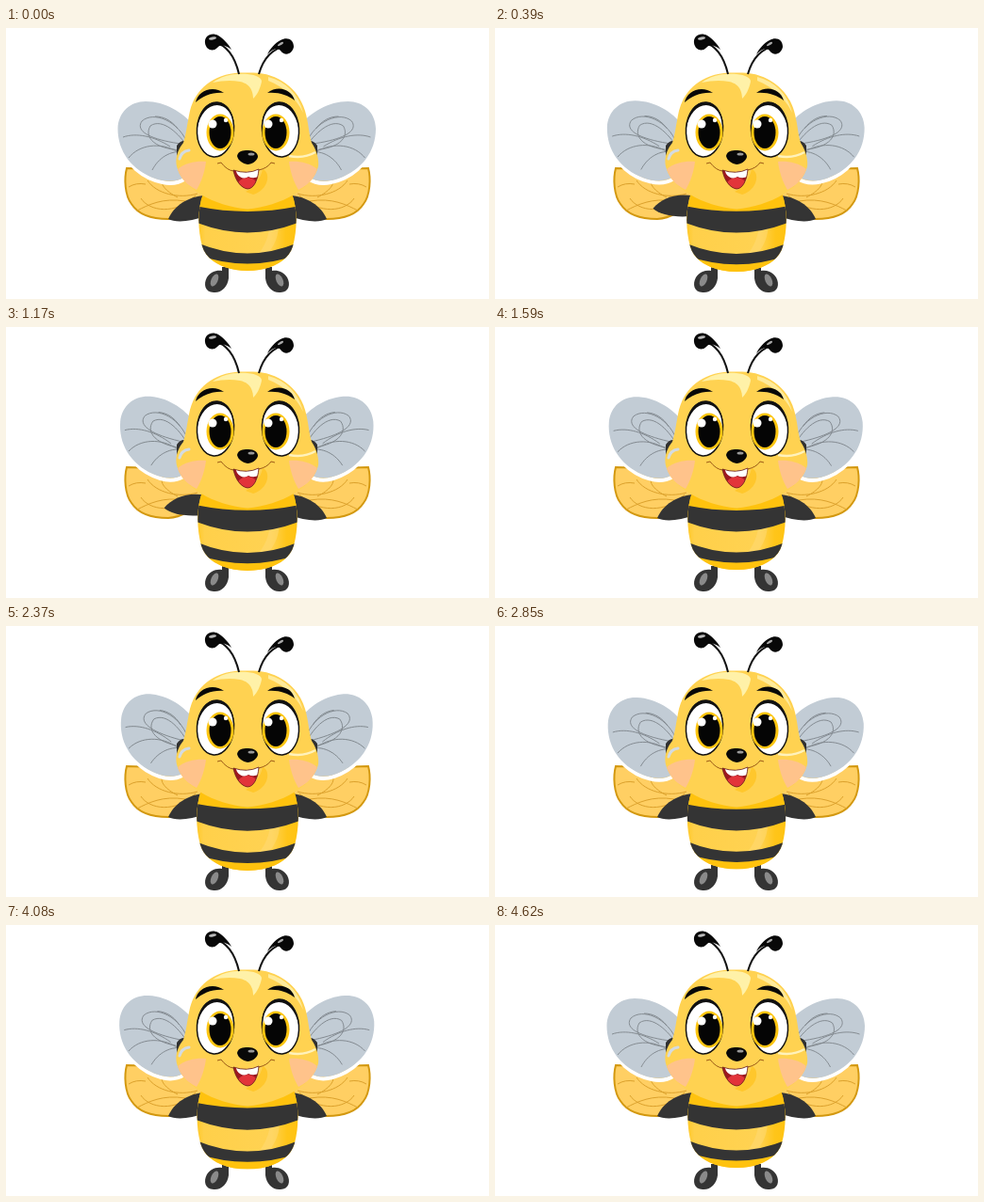
These frames come from a looping animation (512 by 288 pixels, 4.65 s). An HTML page:

```html
<!DOCTYPE html>
<html lang="en">
<head>
<meta charset="utf-8">
<title>Bee</title>
<style>
html, body { margin: 0; width: 100%; height: 100%; overflow: hidden; background: #fff; }
svg { display: block; width: 100vw; height: 100vh; }
</style>
</head>
<body>
<svg viewBox="0 0 512 288">
  <defs>
    <linearGradient id="belly" x1="0" x2="1" y1="0" y2="0">
      <stop offset="0" stop-color="#ffc414"/><stop offset=".1" stop-color="#ffd04a"/><stop offset=".72" stop-color="#ffd252"/><stop offset=".86" stop-color="#ffc51a"/><stop offset="1" stop-color="#ffc20e"/>
    </linearGradient>
    <clipPath id="bodyClip"><path d="M209 176C203 192 203 214 208 232C213 249 234 258 256 258C278 258 299 249 304 232C309 214 309 192 303 176Z"/></clipPath>
    <clipPath id="headClip"><path id="headShape" d="M248 47.500C219 49 201 65 195 88C192 102 191 113 188 122C182 129 179 139 181 147C186 170 220 189 256 192.500C292 189 326 170 331 147C332 139 329 129 324 122C321 113 321 102 317 88C310 64 288 48 262 47.500Z"/></clipPath>
    <clipPath id="mouthClip"><path id="mouth" d="M241 151Q256 156 268 150C267 163 262 171 256 171C249 170 243 162 241 151Z"/></clipPath>

    <g id="lowWing">
      <path d="M128 149C125 160 126 178 133 187C140 198 155 203 172 203C187 202 200 193 210 181L206 160L160 150Z" fill="#ffcf63" stroke="#d3980f" stroke-width="2"/>
      <path d="M203 176C183 182 159 176 150 162M201 178C180 199 152 195 143 181M190 184C166 180 151 188 139 194M182 180C170 174 161 165 167 158M130 169Q138 164 148 166" fill="none" stroke="#dba12c" stroke-width="1"/>
    </g>
    <g id="topWing">
      <path d="M119 120C127 146 146 160 166 164Q180 167 190 160" fill="none" stroke="#fff" stroke-width="4"/>
      <path d="M198 103C188 90 169 78 148 78C132 78 119 89 118.500 107C118.500 131 133 151 158 160C169 164 181 164 190 158L204 135Z" fill="#c2ccd5"/>
      <path d="M193 124C183 98 156 88 144 99C136 111 157 120 193 124M193 127C184 113 166 95 153 104C146 116 157 130 192 130M190 132C174 129 161 139 155 151M181 131C163 121 141 124 130 138M174 126C157 115 138 111 124 116M182 107C175 98 167 94 158 94" fill="none" stroke="#7e858b" stroke-width=".9"/>
    </g>
    <g id="foot">
      <path d="M229 254H236V266C235 275 228 282 220 281C211 281 209 272 213 265C217 259 223 257 229 258Z" fill="#343434"/>
      <ellipse cx="221" cy="268" rx="3.500" ry="7" transform="rotate(24 221 268)" fill="#8a8a8a"/>
    </g>
    <path id="armShape" d="M211 178C193 179 178 189 172 203C179 207 196 206 211 200Z" fill="#343434"/>
    <path id="cheek" d="M182 150C190 143 203 141 212 142C211 152 207 164 202 172C192 167 184 160 182 150Z" fill="#ffc38b"/>
    <g id="eye">
      <ellipse cx="222" cy="108" rx="19.500" ry="29" fill="#fff" stroke="#111" stroke-width="1.500"/>
      <path d="M202.500 108C203 90 210 79 222 79C232 79 239 87 241 99C237 88 231 82 222 82C212 83 205 92 202.500 108Z" fill="#111"/>
    </g>
    <g id="pupil">
      <ellipse rx="14.500" ry="19.500" fill="#fdc510"/>
      <ellipse rx="11.500" ry="17" fill="#050505"/>
      <g fill="#fff"><circle cx="-8" cy="-9" r="4.500"/><circle cx="6" cy="-13" r="2.200"/></g>
    </g>
  </defs>

  <rect width="512" height="288" fill="#fff"/>
  <use href="#lowWing"/>
  <use href="#lowWing" transform="matrix(-1 0 0 1 512 0)"/>
  <g id="wingL"><use href="#topWing"/></g>
  <g transform="matrix(-1 0 0 1 510.500 0)"><g id="wingR"><use href="#topWing"/></g></g>
  <use id="arm" href="#armShape"/>
  <use href="#armShape" transform="matrix(-1 0 0 1 512 0)"/>
  <use href="#foot"/>
  <use href="#foot" transform="matrix(-1 0 0 1 511 0)"/>

  <g id="body">
    <g clip-path="url(#bodyClip)">
      <rect x="200" y="170" width="112" height="92" fill="url(#belly)"/>
      <path d="M200 170H312V205H200ZM200 236Q256 258 312 236V262H200Z" fill="#ffc20e"/>
      <path d="M279 214C277 226 272 236 264 244L274 243C283 234 288 225 289 211Z" fill="#ffdc78" opacity=".5"/>
      <path d="M200 189Q256 201 312 189V206Q256 229 200 206Z" fill="#343434"/>
      <path d="M200 227Q256 252 312 227V240Q256 261 200 240Z" fill="#343434"/>
    </g>
  </g>

  <path d="M181 125Q187 117 193 122L190 137L181 136Z" fill="#303030"/>
  <path d="M330 125Q324 117 318 122L321 137L330 136Z" fill="#303030"/>
  <use href="#headShape" fill="#ffd251"/>
  <g clip-path="url(#headClip)">
    <path d="M219 58C229 51 240 48 256 49C266 50 271 53 271 57C269 66 266 71 262 75C262 66 258 59 248 57C238 55 229 56 219 58Z" fill="#fff1a8"/>
    <path d="M278 52C297 57 310 70 315 90C307 74 295 63 278 56Z" fill="#ffeb9b"/>
    <use href="#cheek"/>
    <use href="#cheek" transform="matrix(-1 0 0 1 512 0)"/>
    <path d="M254 174C263 170 270 160 272 150C281 153 279 172 262 177Z" fill="#ffc72c"/>
  </g>
  <path d="M184 139Q186 131 194 130" fill="none" stroke="#d4dbe0" stroke-width="3" stroke-linecap="round"/>
  <path d="M300 136Q316 139 328 132" fill="none" stroke="#fff2bb" stroke-width="2.500"/>

  <g fill="none" stroke="#111" stroke-width="2">
    <path d="M247 49C243 32 235 18 220 15"/>
    <path d="M268 49C272 35 281 22 297 19"/>
  </g>
  <path d="M211 16C210 8 218 4 225 8C230 11 236 17 239 23C233 18 227 17 224 21C219 26 212 23 211 16Z" fill="#080808"/>
  <path d="M305 20C305 12 298 9 291 13C285 16 280 22 277 28C283 22 288 20 291 24C296 31 304 27 305 20Z" fill="#080808"/>
  <ellipse cx="219" cy="11" rx="4" ry="1.600" transform="rotate(-10 219 11)" fill="#bbb"/>
  <ellipse cx="291" cy="17" rx="3.500" ry="1.300" transform="rotate(-32 291 17)" fill="#aaa"/>

  <path d="M201 79C203 67 219 60 231 69C219 68 209 72 201 79Z" fill="#080808"/>
  <path d="M277 69C288 60 303 65 306 77C298 71 289 68 277 69Z" fill="#080808"/>

  <use href="#eye" transform="rotate(4 222 108)"/>
  <use href="#eye" transform="matrix(-1 0 0 1 513 0) rotate(4 222 108)"/>
  <use href="#pupil" x="227" y="111"/>
  <use href="#pupil" x="286" y="111"/>

  <path d="M245 136C246 130 252 130 257 130C263 130 267 133 267 137C266 141 261 145 256 145C251 144 246 141 245 136Z" fill="#080808"/>
  <ellipse cx="260" cy="134" rx="3.500" ry="1.600" fill="#999"/>
  <path d="M224 144L228 143Q234 151 241 152Q256 156 268 151Q277 149 281 143L285 144" fill="none" stroke="#9c5a16" stroke-width="1"/>
  <use href="#mouth" fill="#9e1820"/>
  <g clip-path="url(#mouthClip)">
    <ellipse cx="256" cy="168" rx="11" ry="9" fill="#e2343a"/>
    <path d="M243 150H269V157Q263 161 257 158Q250 162 245 155Z" fill="#fff"/>
  </g>
  <use href="#mouth" fill="none" stroke="#6b2418" stroke-width=".8"/>
</svg>
<script>
const LOOP = 4650, BREATH = LOOP / 3, BEAT = LOOP / 22.5, BEATS = 22;
const get = id => document.getElementById(id);
const [wingL, wingR, arm, body] = ['wingL', 'wingR', 'arm', 'body'].map(get);

// One smooth swing 0 -> 1 -> 0 while p goes from 0 to 1
const swing = p => (1 - Math.cos(2 * Math.PI * p)) / 2;

function draw(t) {
  // The wings beat quickly and rest briefly before the loop starts again
  const flap = 6.5 * swing(Math.min(t / BEAT, BEATS));
  const turn = `rotate(${flap} 200 135)`;
  wingL.setAttribute('transform', turn);
  wingR.setAttribute('transform', turn);

  const size = 1 + 0.042 * swing(t / BREATH);
  body.setAttribute('transform', `translate(256 212) scale(${size}) translate(-256 -212)`);

  // The arm lifts once, together with the first breath
  const wave = 33 * swing(Math.min(t / BREATH, 1));
  arm.setAttribute('transform', `rotate(${wave} 208 182)`);
}

const start = performance.now();
function tick() {
  draw((performance.now() - start) % LOOP);
  requestAnimationFrame(tick);
}
draw(0);
requestAnimationFrame(tick);
</script>
</body>
</html>
```
